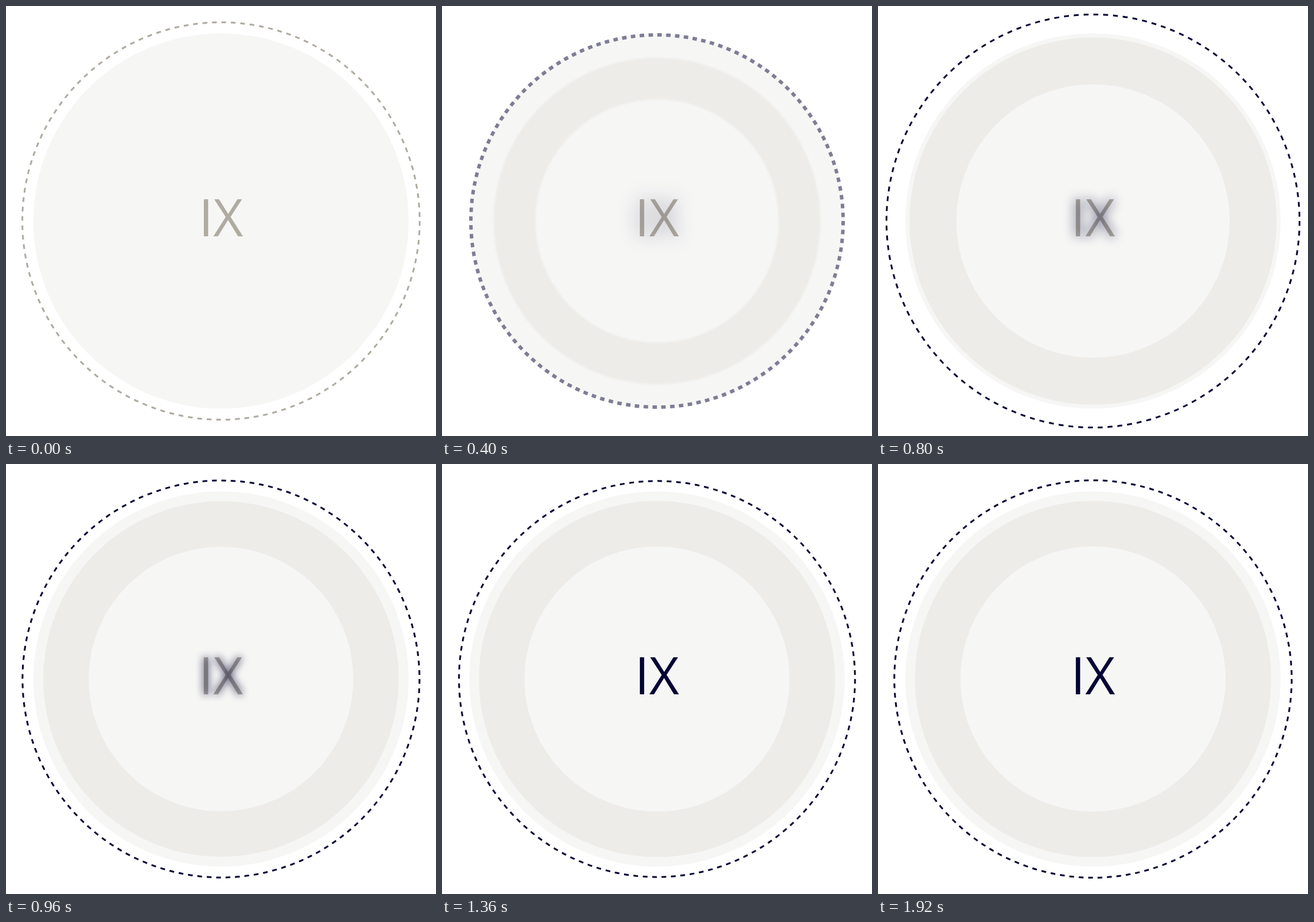
Animation, 730 px wide and 730 px high, one loop 1960 ms. Source, as an HTML page with a canvas:

```html
<!DOCTYPE html>
<html lang="en">
<head>
<meta charset="utf-8">
<title>Numeral badge</title>
<style>
  html, body { margin: 0; width: 100%; height: 100%; overflow: hidden; background: #fff; }
  canvas { display: block; width: 730px; height: 730px; }
</style>
</head>
<body>
<canvas id="stage" width="730" height="730"></canvas>
<script>
const ctx = document.getElementById('stage').getContext('2d');
const LOOP = 1960, STEP = 40, START = 200;
const C = 365;
const DARK = '#050535', GREY = '#b0aba0', DISC = '#f6f6f5', BAND = '#edece8';
const DASHES = 132, RING_R = 337.3;

// Turning points of each springy scale: [time, value]
const ringScale = [[200, 0.858], [660, 1.056], [1120, 0.978], [1520, 1.0065], [1920, 1]];
const bandScale = [[200, 0.829], [660, 1.0505], [1000, 0.996], [1300, 1]];

const clamp = v => Math.max(0, Math.min(1, v));
const ramp = (t, from, to) => clamp((t - from) / (to - from));
const mix = (a, b, k) => a + (b - a) * k;

function swing(keys, t) {
  for (let i = 1; i < keys.length; i++) {
    const [t0, a] = keys[i - 1], [t1, b] = keys[i];
    if (t <= t1) return mix(a, b, (1 - Math.cos(Math.PI * ramp(t, t0, t1))) / 2);
  }
  return keys[keys.length - 1][1];
}

// Runs a drawing routine with its own opacity and blur
function layer(alpha, blur, draw) {
  if (alpha <= 0) return;
  ctx.save();
  ctx.globalAlpha = alpha;
  if (blur > 0.05) ctx.filter = `blur(${blur}px)`;
  draw();
  ctx.restore();
}

function circle(r) {
  ctx.beginPath();
  ctx.arc(C, C, r, 0, Math.PI * 2);
}

function dashedRing(scale, width, color) {
  const r = RING_R * scale;
  const dash = Math.PI * r / DASHES;
  ctx.setLineDash([dash, dash]);
  ctx.lineWidth = width;
  ctx.strokeStyle = color;
  circle(r);
  ctx.stroke();
}

function numeral(color) {
  ctx.font = '400 88px "Open Sans", sans-serif';
  ctx.textAlign = 'center';
  ctx.fillStyle = color;
  ctx.fillText('IX', C, 391);
}

function render(t) {
  const on = t > START;
  ctx.fillStyle = '#fff';
  ctx.fillRect(0, 0, 730, 730);

  ctx.fillStyle = DISC;
  circle(318.5);
  ctx.fill();

  if (on) {
    const s = swing(bandScale, t);
    layer(ramp(t, START, 400), 2.4 * (1 - ramp(t, START, 900)), () => {
      ctx.strokeStyle = BAND;
      ctx.lineWidth = 77.3 * s;
      circle(263.65 * s);
      ctx.stroke();
    });
  }

  layer(1 - ramp(t, START, 400), 0, () => dashedRing(1, 3, GREY));
  if (on) {
    const width = mix(8.5, 3, ramp(t, START, 620));
    layer(ramp(t, START, 600), 0.8 * (1 - ramp(t, START, 620)), () =>
      dashedRing(swing(ringScale, t), width, DARK));
  }

  // The dark numeral sharpens over the grey one
  const p = ramp(t, START, 1360);
  if (p < 1) numeral(GREY);
  layer(Math.pow(p, 0.55), 20 * (1 - p), () => numeral(DARK));
}

const begin = performance.now();
function tick() {
  const t = (performance.now() - begin) % LOOP;
  render(Math.floor(t / STEP) * STEP);
  requestAnimationFrame(tick);
}
tick();
</script>
</body>
</html>
```
